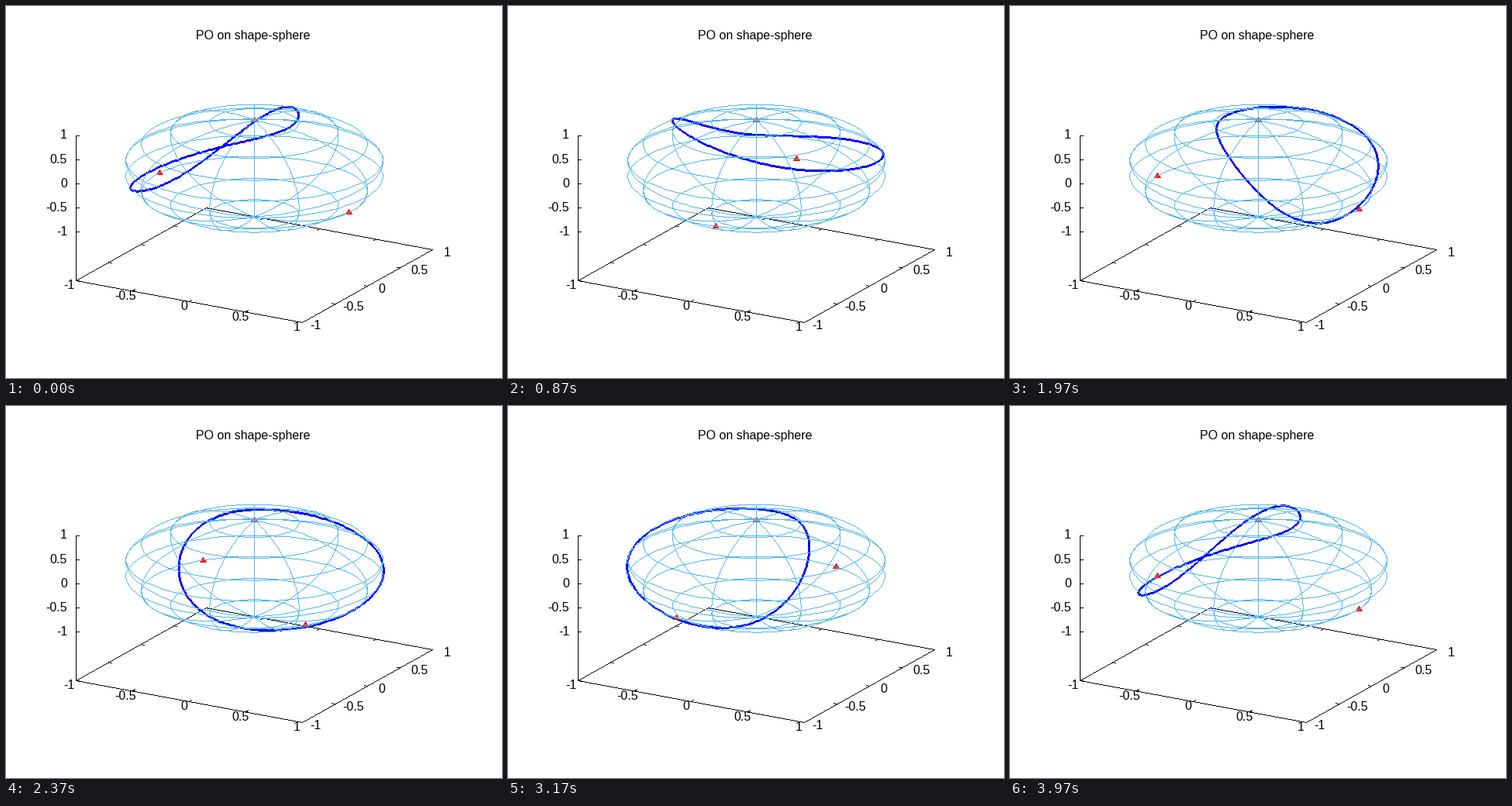
Write a matplotlib script that moves like this. It is 640 by 480 pixels and loops after 4010 ms.

```python
import numpy as np
import matplotlib.pyplot as plt
from matplotlib.animation import FuncAnimation

W, H, DPI = 640, 480, 100
FRAMES, LOOP_MS = 120, 4010
BLACK, BLUE, RED, SKY = (0, 0, 0), (0, 0, 255), (255, 0, 0), (86, 180, 233)

plt.rcParams["font.family"] = "Liberation Sans"
plt.rcParams["font.size"] = 16 * 72 / DPI

fig = plt.figure(figsize=(W / DPI, H / DPI), dpi=DPI, facecolor="white")
ax = fig.add_axes([0, 0, 1, 1])
ax.axis("off")

COS30, SIN30 = np.cos(np.pi / 6), 0.5


def project(x, y, z):
    """Orthographic view: 60 degrees tilt, 30 degrees turn."""
    across = COS30 * x + SIN30 * y
    depth = COS30 * y - SIN30 * x
    return 320 + 168.4 * across, 209.1 - 62.35 * z - 54 * depth


def to_pixel(v):
    return np.floor(np.asarray(v) + 0.5).astype(int)


def trace(x, y):
    """Pixels of a hard-edged polyline, as two integer arrays."""
    pts = to_pixel(np.column_stack([x, y]))
    cells = []
    for a, b in zip(pts, pts[1:]):
        n = max(abs(b - a).max(), 1)
        cells.append(to_pixel(a + np.outer(np.arange(n + 1) / n, b - a)))
    px, py = np.concatenate(cells).T
    return px, py


def paint(canvas, pixels, color):
    px, py = pixels
    canvas[py, px] = color


def segment(canvas, a, b):
    paint(canvas, trace([a[0], b[0]], [a[1], b[1]]), BLACK)


def tick(canvas, at, toward, size=4):
    step = np.array(toward, float)
    segment(canvas, at, np.array(at) + size * step / np.hypot(*step))


def label(x, y, text, ha):
    ax.text(x, y, text, ha=ha, va="baseline", color="black")


def draw_axes(canvas):
    base = -2
    corners = [project(x, y, base)
               for x, y in [(-1, -1), (1, -1), (1, 1), (-1, 1), (-1, -1)]]
    for a, b in zip(corners, corners[1:]):
        segment(canvas, a, b)
    segment(canvas, corners[0], project(-1, -1, 1))

    x_dir, y_dir = np.array([145.8, 27]), np.array([84.2, -46.8])
    for v in (-1, -0.5, 0, 0.5, 1):
        text = f"{v:g}"
        pad = 4.45 if v >= 0 else 0  # blank in place of the sign

        px, py = project(v, -1, base)
        tick(canvas, (px, py), y_dir)
        tick(canvas, project(v, 1, base), -y_dir)
        label(px - 8.9 + pad / 2, py + 11, text, "center")

        px, py = project(1, v, base)
        tick(canvas, (px, py), -x_dir)
        tick(canvas, project(-1, v, base), x_dir)
        label(px + 9.8 + pad, py + 8.5, text, "left")

        px, py = project(-1, -1, v)
        tick(canvas, (px, py), (1, 0))
        label(78.6, py + 4.4, text, "right")
    label(318.6, 43, "PO on shape-sphere", "center")


def sphere_pixels():
    turn = np.linspace(0, 2 * np.pi, 100)
    half = np.linspace(-np.pi / 2, np.pi / 2, 100)
    lines = [(lat + 0 * turn, turn) for lat in np.radians(range(-70, 71, 20))]
    lines += [(half, lon + 0 * half) for lon in np.radians(range(0, 360, 40))]
    cells = [trace(*project(np.cos(lat) * np.cos(lon),
                            np.cos(lat) * np.sin(lon), np.sin(lat)))
             for lat, lon in lines]
    return np.concatenate(cells, axis=1)


def orbit():
    """Egg-shaped loop around two collision points: (along, side, up)."""
    s = np.linspace(0, 2 * np.pi, 301)
    t = np.sin(np.radians(73.25)) * np.cos(s)
    side = 0.846 * np.sin(s) * (1 - 0.05 * np.cos(s))
    m = np.sqrt(np.maximum(1 - t**2 - side**2, 0))
    tilt = np.radians(30 + 3.75)
    return m * np.cos(tilt) - t * np.sin(tilt), side, \
        m * np.sin(tilt) + t * np.cos(tilt)


BACKDROP = np.full((H, W, 3), 255, np.uint8)
draw_axes(BACKDROP)
SPHERE = sphere_pixels()
ALONG, SIDE, UP = orbit()

# Round pen for the loop and a small filled triangle for the marks
PEN = [(0, 0), (1, 0), (-1, 0), (0, 1), (0, -1)]
TRIANGLE = np.array([(x, y) for y in range(-4, 3) for x in range(-4, 5)
                     if abs(x) <= round((y + 4) * 2 / 3)]).T

image = ax.imshow(BACKDROP, interpolation="nearest", aspect="auto",
                  extent=(-0.5, W - 0.5, H - 0.5, -0.5))


def update(k):
    canvas = BACKDROP.copy()
    a = np.radians(177 - 360 * k / FRAMES)
    c, s = np.cos(a), np.sin(a)

    px, py = trace(*project(ALONG * c + SIDE * s, ALONG * s - SIDE * c, UP))
    for dx, dy in PEN:
        paint(canvas, (px + dx, py + dy), BLUE)

    r = np.sqrt(3) / 2
    for spot in [(0, 0, 1), (r * c, r * s, -0.5), (-r * c, -r * s, -0.5)]:
        center = to_pixel(project(*spot))
        paint(canvas, TRIANGLE + center[:, None], RED)

    paint(canvas, SPHERE, SKY)
    image.set_data(canvas)
    return image,


anim = FuncAnimation(fig, update, frames=FRAMES, interval=LOOP_MS / FRAMES,
                     repeat=True, repeat_delay=0, blit=False)
plt.show()
```
